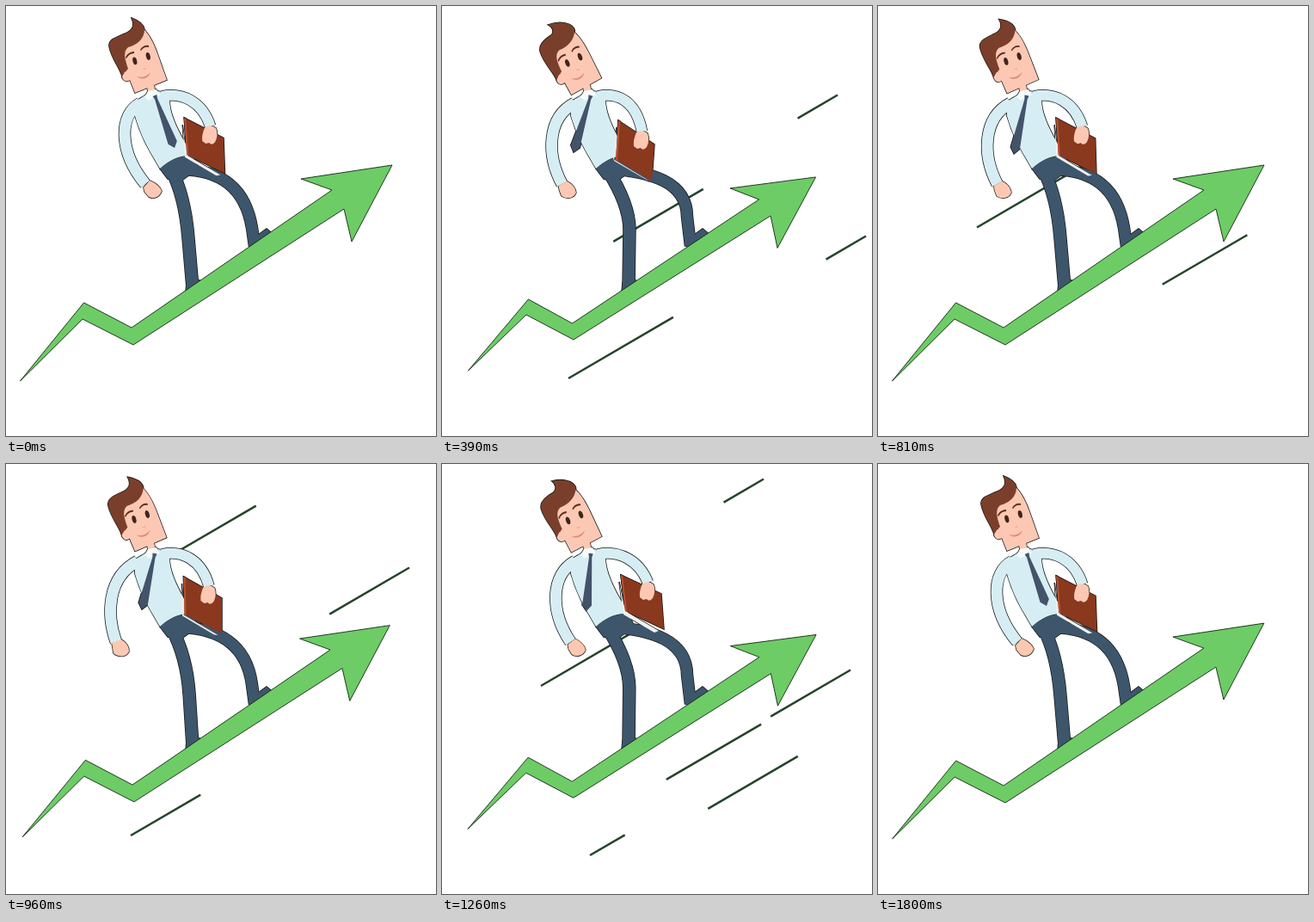
An HTML page that plays this animation: 500 px wide and 500 px high, repeating every 1830 ms.

```html
<!DOCTYPE html>
<html lang="en">
<head>
<meta charset="utf-8">
<title>Riding the growth arrow</title>
<style>
  html, body { margin: 0; width: 100%; height: 100%; overflow: hidden; background: #fff; }
  svg { display: block; width: 100vw; height: 100vh; }
</style>
</head>
<body>
<svg viewBox="0 0 500 500">
  <g id="streaks"></g>
  <g id="outline"></g>
  <g id="man"></g>
  <path id="arrow" fill="#6dcc66" stroke="#142414" stroke-width=".9"/>
  <g id="glints" opacity=".45"></g>
</svg>
<script>
const LOOP = 1830, STEP = 30;
const KEY_TIMES = [0, 390, 630, 960, 1260, 1500, 1800];
const SHIRT = '#d6eef3', NAVY = '#3d566c', SKIN = '#fdc8b3', HAIR = '#7a3f2b', TIE = '#43536a';
const INK = '#161616';

// Streaks: start time, lower-left end x and y, optional 1 = also shines over the body
const STREAKS = [
  [180, 147, 433], [270, 60, 355], [360, 135, 293], [360, 168, 457],
  [450, 48, 209, 1], [600, 115, 257.5], [720, 145, 432], [840, 47, 190.7],
  [900, 144, 310], [990, 172, 455], [1050, 115, 258], [1110, 168, 421],
  [1140, 170, 482], [1200, 150, 429], [1230, 49, 207], [1290, 90, 234, 1],
  [1290, 125, 324], [1380, 174, 459], [1380, 181, 480], [1470, 115, 257.5], [1470, 174, 417]
];
const SPAN = 325, SLOPE = 0.583;

const get = id => document.getElementById(id);
const clamp = v => Math.max(0, Math.min(1, v));

// Blend two paths that share the same commands
function morph(a, b, k) {
  const ends = b.match(/-?[\d.]+/g);
  let i = 0;
  return a.replace(/-?[\d.]+/g, n => (+n + (ends[i++] - n) * k).toFixed(2));
}

// Smooth cyclic curve through one value per key time
function curve(t, values) {
  const last = KEY_TIMES.length - 1;
  const at = i => i < 0 ? values[last + i] : i > last ? values[i - last] : values[i];
  const time = i => i < 0 ? KEY_TIMES[last + i] - 1800 : i > last ? KEY_TIMES[i - last] + 1800 : KEY_TIMES[i];
  const slope = i => (at(i + 1) - at(i - 1)) / (time(i + 1) - time(i - 1));
  let i = 0;
  while (i < last - 1 && t > KEY_TIMES[i + 1]) i++;
  const d = time(i + 1) - time(i), u = Math.min(1, (t - time(i)) / d), w = 1 - u;
  return w * w * (1 + 2 * u) * at(i) + u * u * (3 - 2 * u) * at(i + 1)
    + d * u * w * (w * slope(i) - u * slope(i + 1));
}

// Two unequal bounces per loop
function bounce(t) {
  const phase = t < 815 ? t / 815 : (t - 815) / 1015;
  return (1 - Math.cos(phase * 2 * Math.PI)) / 2;
}

function streak(t, [start, x, y]) {
  const n = (t - start) / STEP;
  if (n <= 0 || n >= 10) return '';
  const a = SPAN * clamp(1 - n / 7), b = SPAN * clamp(1 - (n - 2) / 8);
  return `<path d="M${x + a},${y - a * SLOPE}L${x + b},${y - b * SLOPE}" stroke="#25432a" stroke-width="2.5"/>`;
}

function tiePath(x, y) {
  const dx = x - 173, dy = y - 104, len = Math.hypot(dx, dy), nx = -dy / len, ny = dx / len;
  const p = (f, w) => `${173 + dx * f + nx * w},${104 + dy * f + ny * w}`;
  return `M${p(0, -2.6)}L${p(.07, -1.6)} ${p(.9, -5.5)} ${p(1, 0)} ${p(.9, 5.5)} ${p(.07, 1.6)} ${p(0, 2.6)}Z`;
}

const fill = (d, color, turn = '') => ({ d, color, width: 0, turn });
const limb = (d, color, width) => ({ d, color, width, turn: '' });

function headParts(h) {
  const turn = `rotate(${-7 * h} 168 98)`;
  const part = (d, color) => fill(d, color, turn);
  return [
    part('M136,50L156,24C166,30 172,44 176,55L187,86L150,101L144,86C139,90 134,85 135,79C136,75 139,75 140,76Z', SKIN),
    part(morph(
      'M135,82C132,71 123,62 120,47C119,39 127,37 136,33C145,30 151,25 146,14C154,17 160,21 161,27C161,38 153,45 142,48C136,53 138,61 142,73L138,77Z',
      'M135,82C132,71 123,62 120,47C119,39 127,33 136,29C139,25 138,20 133,17C146,14 161,17 163,27C161,38 153,45 142,48C136,53 138,61 142,73L138,77Z', h), HAIR),
    part('M139,60C141,55 145,53 149,53L149,55C145,55 142,57 140,61Z', '#5b2d20'),
    part('M156,51C158,47 162,45 166,46L166,48C162,47 159,49 157,52Z', '#5b2d20'),
    part('M147.5,64.5a2.4,4 -15 1 0 4.6,-1.2a2.4,4 -15 1 0 -4.6,1.2', '#3f241e'),
    part('M163,59a2.4,4 -15 1 0 4.6,-1.2a2.4,4 -15 1 0 -4.6,1.2', '#3f241e'),
    part('M152,82C158,84 164,82 168,77C166,84 158,87 152,82Z', '#d98d7b'),
    part('M158,73L163,72L162,74Z', '#eda792')
  ];
}

function manParts(t, k) {
  const head = curve(t, [0, 1, .45, .2, .8, .5, 0]);
  const swing = curve(t, [0, .66, .24, 1, .37, -.16, 0]);
  const tilt = curve(t, [.25, 1, .08, .5, 0, .95, .25]);
  const tieX = curve(t, [196, 153, 159, 158, 168, 176, 196]);
  const tieY = curve(t, [165, 170, 175, 169, 171, 170, 165]);
  const handX = 240 - 7 * tilt, handY = 147 + 8 * tilt;
  const book = (a, b) => morph(a, b, tilt);
  return [
    limb(morph('M192,190C205,215 210,245 212,270L217,328', 'M192,190C210,218 218,240 218,260L217,328', k), NAVY, 14),
    limb(morph('M205,190C248,191 278,210 286,258L289,279', 'M205,190C240,194 285,203 285,245L289,279', k), NAVY, 13),
    fill('M284,279L288,270L303,259L309,264L290,284Z', NAVY),
    fill('M210,322L225,319L224,334L209,332Z', NAVY),
    fill('M179,189C190,179 203,174 217,174L224,190L214,196L203,204L188,201Z', NAVY),
    fill('M164,94L172,91L174,101L166,106Z', SKIN),
    limb(morph('M156,113C132,126 130,168 162,207', 'M153,113C117,132 117,176 128,207', swing), SHIRT, 13),
    fill(morph('M160,211L167,203C172,205 178,208 181,215C179,222 172,225 166,222L161,216Z',
      'M123,208L134,204C139,207 143,211 143,218C140,225 130,225 125,220L124,214Z', swing), SKIN),
    fill('M149,112C155,107 160,106 164,102L178,99L190,108C190,125 199,142 206,155L217,174C202,173 190,179 179,189C169,171 159,158 150,128Z', SHIRT),
    fill('M161,106L165,99L175,97L179,104L172,106L166,110Z', '#f4fbfd'),
    fill(tiePath(tieX, tieY), TIE),
    limb(`M181,105C205,100 ${229 - 3 * tilt},111 ${handX - .5},${handY - 9}`, SHIRT, 12),
    fill(book('M206,137L213,171L252,194L247,196L211,175Z', 'M203,141L200,180L241,204L237,201L199,178Z'), '#f1f1ef'),
    fill(book('M208,129L255,151L258,192L213,171Z', 'M205,133L247,161L244,203L202,179Z'), '#8a381e'),
    fill(book('M208,129L210,130L215,172L213,171Z', 'M205,133L207,134L204,180L202,179Z'), '#b95234'),
    fill(`M${handX - 7},${handY - 8}q7,-4 13,1q3,8 -1,16q-4,5 -7,1l-4,1l-4,-3q-1,-7 3,-16Z`, SKIN),
    ...headParts(head)
  ];
}

const attrs = p => `d="${p.d}" transform="${p.turn}"`;
const outline = p =>
  `<path ${attrs(p)} fill="${p.width ? 'none' : INK}" stroke="${INK}" stroke-width="${p.width + 1.5}"/>`;
const paint = p => p.width
  ? `<path ${attrs(p)} fill="none" stroke="${p.color}" stroke-width="${p.width}"/>`
  : `<path ${attrs(p)} fill="${p.color}"/>`;

function draw(t) {
  const k = bounce(t), parts = manParts(t, k);
  get('streaks').innerHTML = STREAKS.map(s => streak(t, s)).join('');
  get('glints').innerHTML = STREAKS.filter(s => s[3]).map(s => streak(t, s)).join('');
  get('outline').innerHTML = parts.map(outline).join('');
  get('man').innerHTML = parts.map(paint).join('');
  get('arrow').setAttribute('d', morph(
    'M16.5,436L90.5,345L146,374L379,214L343,201L449,185L402,274L393,236L148,394L89,364Z',
    'M30.5,424L100.5,341L151.5,369L368.5,225L335,212L434.5,199L390,281.5L382,244L153,388L98,359Z', k));
}

function tick(now) {
  draw(Math.floor((now % LOOP) / STEP) * STEP);
  requestAnimationFrame(tick);
}
draw(0);
requestAnimationFrame(tick);
</script>
</body>
</html>
```
